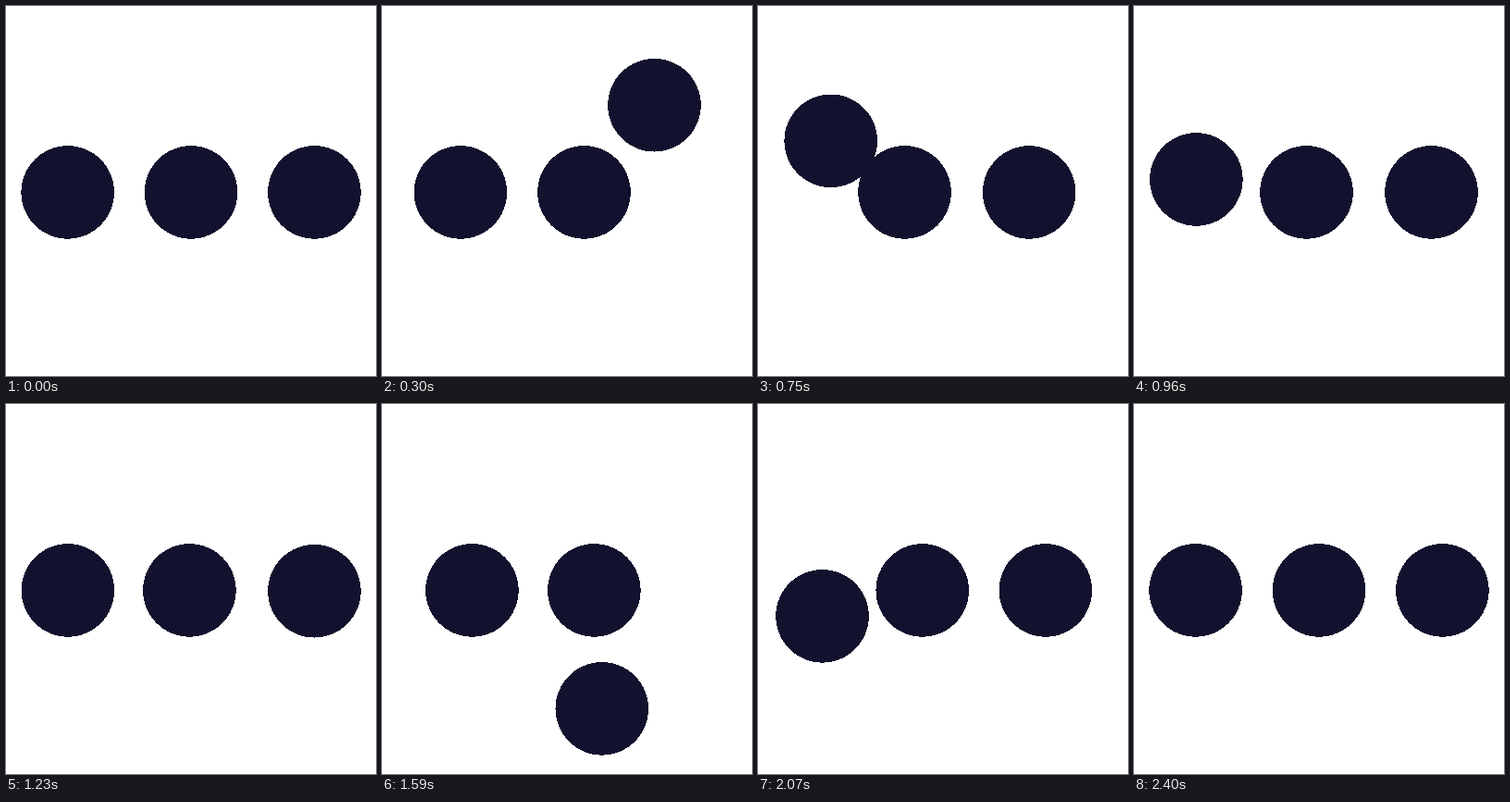
An HTML page for the animation above (2430 ms loop, 400x400 px).

```html
<!DOCTYPE html>
<html lang="en">
<head>
<meta charset="utf-8">
<title>Three dots</title>
<style>
  html, body { margin: 0; width: 100%; height: 100%; overflow: hidden; background: #fff; }
  svg { display: block; width: 100vw; height: 100vh; fill: #12122e; shape-rendering: crispEdges; }
</style>
</head>
<body>
<svg viewBox="0 0 400 400">
  <circle r="50.3"/>
  <circle r="50.3"/>
  <circle r="50.3"/>
</svg>
<script>
  const LOOP = 2430, TICK = 30, HALF = 1200;
  const LEFT = 66.7, MID = 200, MID_REST = 198.2, RIGHT = 333.4;
  const BASE = 201.4, RADIUS = 133.4;
  const dots = document.querySelectorAll('circle');

  // Easing curve with control points (x1, 0) and (x2, 1)
  const ease = (x1, x2) => t => {
    let lo = 0, hi = 1, s = t;
    for (let i = 0; i < 30; i++) {
      s = (lo + hi) / 2;
      const r = 1 - s;
      const x = 3 * r * r * s * x1 + 3 * r * s * s * x2 + s ** 3;
      if (x < t) lo = s; else hi = s;
    }
    return s * s * (3 - 2 * s);
  };
  const slide = ease(0.39, 0.61);
  const swing = ease(0.33, 0.32);
  const mix = (a, b, p) => a + (b - a) * p;

  function place(dot, x, y = BASE) {
    dot.setAttribute('cx', x.toFixed(2));
    dot.setAttribute('cy', y.toFixed(2));
  }

  // Half circle from the right end to the left; side is -1 above, 1 below
  function orbit(dot, p, side) {
    const a = Math.PI * p;
    place(dot, MID + RADIUS * Math.cos(a), BASE + side * RADIUS * Math.sin(a));
  }

  function draw() {
    const t = Math.floor(performance.now() % LOOP / TICK) * TICK;
    const [a, b, c] = dots;
    if (t <= HALF) {
      const u = t / HALF, p = slide(u);
      place(a, mix(LEFT, MID_REST, p));
      place(b, mix(MID, RIGHT, p));
      orbit(c, swing(u), -1);
    } else {
      const u = Math.min(1, (t - HALF) / HALF), p = slide(u);
      place(a, mix(MID_REST, RIGHT, p));
      orbit(b, swing(u), 1);
      place(c, mix(LEFT, MID, p));
    }
    requestAnimationFrame(draw);
  }
  draw();
</script>
</body>
</html>
```
